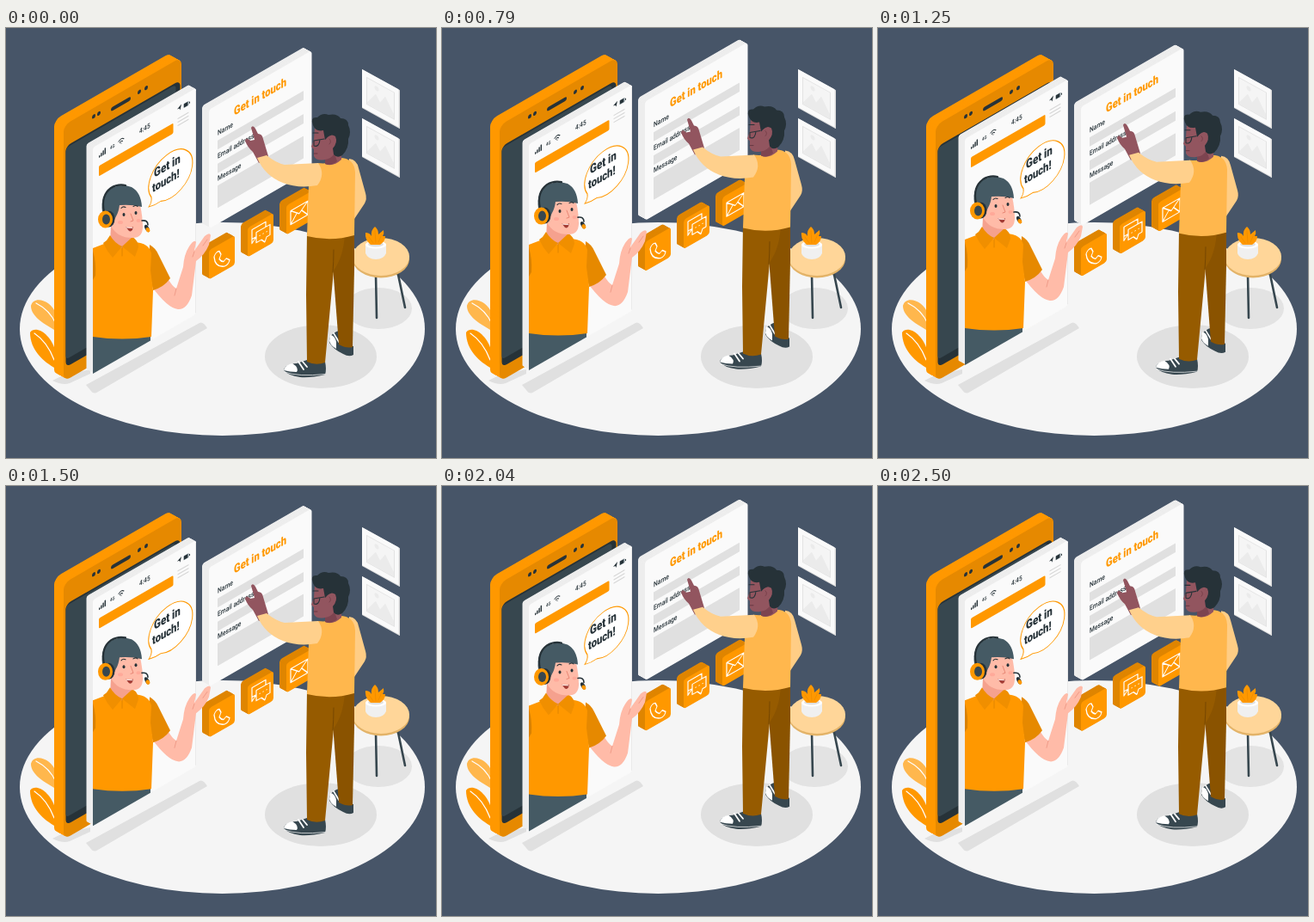
These frames come from a looping animation (500 px wide and 500 px high, 2.54 s). An HTML page:

```html
<!DOCTYPE html>
<html lang="en">
<head>
<meta charset="utf-8">
<style>
html, body { margin: 0; width: 100%; height: 100%; overflow: hidden; background: #475568; }
svg { display: block; width: 100vw; height: 100vh; }
text { font-family: Roboto, sans-serif; font-weight: 500; fill: #263238; }
.bold { font-weight: 800; }
.line { fill: none; stroke-linecap: round; stroke-linejoin: round; }
</style>
</head>
<body>
<svg id="stage" viewBox="0 0 500 500"></svg>
<script>
const LOOP = 2540, PERIOD = 1500, RISE = 10;
const ORANGE = '#ff9800', SHADE = '#e68900', DARK = '#263238', SLATE = '#37474f', GREY = '#455a64';
const SKIN = '#ffbba8', BROWN_SKIN = '#92555f';

const path = (d, fill, extra = '') => `<path d="${d}" fill="${fill}" ${extra}/>`;
const line = (d, color, width = 1) => `<path class="line" d="${d}" stroke="${color}" stroke-width="${width}"/>`;
const rect = (x, y, w, h, r, fill) => `<rect x="${x}" y="${y}" width="${w}" height="${h}" rx="${r}" fill="${fill}"/>`;
const oval = (x, y, rx, ry, fill, extra = '') => `<ellipse cx="${x}" cy="${y}" rx="${rx}" ry="${ry}" fill="${fill}" ${extra}/>`;
// Upright plane rising to the right
const plane = (x, y, content) => `<g transform="matrix(1 -.577 0 1 ${x} ${y})">${content}</g>`;
const label = (x, y, size, str, attrs = '') =>
  `<text transform="matrix(.8 -.462 0 1 ${x} ${y})" font-size="${size}" ${attrs}>${str}</text>`;

// Extruded board: side layers first, then the front with its content
function slab(x, y, w, h, r, depth, side, front, content = '') {
  let out = '';
  for (let d = depth; d > 0; d -= .5) out += plane(x - d, y - d * .55, rect(0, 0, w, h, r, side));
  return out + plane(x, y, rect(0, 0, w, h, r, front) + content);
}

const floor = oval(251.5, 350, 235.5, 124, '#f5f5f5')
  + oval(366, 382, 65, 37, '#e0e0e0')
  + oval(433, 326, 39, 24, '#e3e3e3')
  + path('M93 415L225 343Q229 341 234 349L107 423Q102 427 98 421Z', '#e0e0e0')
  + path('M54 410L66 404L98 397V402L74 413Q66 416 54 410Z', '#e0e0e0');

const leaves = path('M58 352C46 345 29 336 29 323C32 310 54 317 58 333Z', '#ffb74d')
  + path('M58 396C43 388 28 374 28 354C34 345 53 355 58 378Z', ORANGE)
  + line('M35 320Q51 328 58 344M33 355Q48 365 56 386', '#fff', 1.2);

const phone = slab(67, 113, 137, 298, 8, 11, ORANGE, SHADE,
  rect(2.5, 26, 133, 257, 6, DARK)
  + rect(2.5, 28, 128, 246, 4, SLATE)
  + rect(55, 11.5, 23, 4.5, 2.2, DARK)
  + [[35, 10], [41, 10], [88, 12], [96, 12]].map(([x, y]) => oval(x, y, 2, 2.3, DARK)).join(''));

const picture = y => `<g transform="matrix(1 .55 0 1 414 ${y})">`
  + rect(0, 0, 44, 45, .5, '#dcdcdc') + rect(0, 0, 42.5, 44, .5, '#fafafa')
  + rect(5, 6, 33, 32, 0, '#e3e3e3') + rect(6, 7, 31, 30, 0, '#f5f5f5')
  + path('M6 35L16 20L21 27L27 17L37 32V37H6Z', '#ebebeb') + oval(17, 13, 2.6, 2.6, '#ebebeb') + '</g>';

const table = line('M430 286L431 337M455 282L464 325', SLATE, 2.6)
  + oval(436, 268.5, 33, 22, '#e3b368') + oval(436, 266, 33, 22, '#ffd699')
  + path('M418 252V262Q421 269 430 269Q439 269 442 262V252Z', '#f0f0f0')
  + oval(430, 252, 12, 4.5, '#fff') + oval(430, 251.5, 9, 3, '#e0e0e0')
  + path('M424 252Q417 246 418 238Q423 238 425 242Q424 235 429 231Q433 234 433 240L439 235Q440 239 438 242L441 242Q441 248 435 252Z', ORANGE)
  + line('M422 243L427 250M429 236L430 250M437 240L433 249', SHADE, .6);

const form = slab(236, 95, 119.5, 138.5, 3.5, 8, '#ededed', '#fafafa',
    [[41.5, 10.5], [68.5, 11], [94, 26]].map(([y, h]) => rect(10, y, 100, h, .5, '#e0e0e0')).join(''))
  + label(265, 102, 14, 'Get in touch', `class="bold" style="fill:${ORANGE}"`)
  + label(246, 125, 8.4, 'Name') + label(246, 152, 8.4, 'Email address') + label(246, 178, 8.4, 'Message');

const glyphs = [
  'M6 11Q8 6 12 8L14 13L12 17Q14 21 17 23L20 21L24 25Q23 30 18 29Q7 24 6 11Z',
  'M10 16H5V5H21V11M10 11H26V23H22L20 28L16 23H10ZM5 16V21L10 16M14 17H14.2M18 17H18.2M22 17H22.2',
  'M5 9H25V25H5ZM5 9L15 18L25 9M5 25L12 16M25 25L18 16'];
const icons = glyphs.map((d, i) =>
  slab(236 + 45 * i, 258.5 - 26 * i, 30, 34, 3, 8, '#df8500', ORANGE, line(d, '#fff', 1.2))).reverse().join('');

const man =
  // trousers and shoes
  path('M387 352L390 368L404 370V380Q399 383 392 379Q381 374 376 366Q375 356 387 352Z', SLATE)
  + path('M377 357Q382 357 384 365L384 373Q377 369 376 364Z', '#fff')
  + line('M381 355L387 365', '#fff', 1.7)
  + path('M350 386L371 388Q373 397 371 403Q354 407 342 406Q328 404 323 398Q324 391 338 390Z', SLATE)
  + path('M323 398Q325 391 333 390Q341 395 338 400Q330 400 323 398Z', '#fff')
  + line('M340 388L346 397M345 388L350 394', '#fff', 1.8)
  + line('M324 400Q340 406 371 402.500', '#fff', .7)
  + path('M378 240L405 236L405 280L403 371Q396 373 387 368L381 290Z', '#8a5300')
  + path('M350 238H394Q393 265 381 282L371 389Q360 393 350 388L349 310Z', '#965b00')
  + line('M381 258Q381 272 380 284', '#6e4200', .8)
  // pointing hand
  + path('M285 116Q287 112 290 117L293 123Q298 123 299 129L305 149L294 157L287 144Q281 139 278 131Q279 126 284 131L289 130Z', BROWN_SKIN)
  // right arm, torso, left sleeve
  + path('M399 152Q408 153 410 163L418 192Q420 199 417 204L405 222L398 215Z', '#ffcd85')
  + path('M362 157Q380 159 388 151Q405 151 406 168L405 241Q378 249 350 242L352 183Z', '#ffb74d')
  + path('M303 148Q314 157 324 159L363 157Q372 170 362 183Q340 187 322 180Q301 172 292 151Z', '#ffd08c')
  // head
  + path('M359 116L358 130L355 138L358 141L358 149Q361 155 371 153V158Q380 162 390 153L391 122Z', BROWN_SKIN)
  + path('M371 153Q378 152 382 146L385 155Q378 161 371 158Z', '#7d4450')
  + path('M357 113Q353 103 362 104Q368 98 375 101Q385 99 389 105Q398 105 398 113Q402 121 398 129Q399 140 391 148Q385 152 381 147L380 140Q386 133 383 126Q378 122 373 128L371 130L369 119Q360 121 357 113Z', DARK)
  + oval(376.5, 132, 4.5, 6, BROWN_SKIN) + line('M376 129Q379 132 376 135', '#6d3843', .7)
  + line('M357 122L363 122M370 129L358 131V137Q364 139 365 130', DARK, 1.1)
  + line('M358 146H362', '#5f303b', .8);

const statusBar =
  [0, 1, 2, 3].map(i => rect(7 + i * 2.2, 13.500 - i * 1.6, 1.4, 2.500 + i * 1.6, .4, DARK)).join('')
  + line('M30 10.500Q33 7 36 10.500M31.500 12.500Q33 10.500 34.500 12.500M33 14V14.100', DARK, 1)
  + path('M98 12L103 9L101.500 15L100.500 12.500Z', DARK)
  + rect(105.500, 10, 6, 5, .8, '#78868d') + rect(106, 10.500, 4, 4, .3, DARK) + rect(112, 11.500, 1, 2, 0, DARK)
  + line('M99 23.500H111M99 27.500H111M99 31.500H111', '#d5d5d5', 1.2);

const operatorHead =
  path('M122 230H147V248L134 256L121 249Z', '#f5a18e')
  + path('M117 247L121 241Q126 250 135 254L124 267Q117 259 113 250ZM147 243Q154 247 154 255L150 266L135 254Z', '#f08f00')
  + line('M135 254V265', '#d98100', .8)
  + path('M121 205Q137 194 156 206Q159 220 159 231Q159 244 147 244Q129 244 122 230Z', SKIN)
  + path('M113 219Q108 198 120 188Q132 180 146 185Q157 191 158 208Q147 205 132 206Q131 214 128 219L123 229Z', GREY)
  + line('M134 209.500Q136 207 139 208.500M148 207.500Q151 205.500 153 207.500', DARK, 1.1)
  + oval(137, 217, 1.5, 2, DARK) + oval(151, 215, 1.5, 2, DARK)
  + line('M145 216L148 224L145 225', '#e88775', 1)
  + path('M139 231Q144 234 148 231Q147 238 143 236Z', '#a33c35') + line('M140 232L147 232.500', '#fff', .8)
  + oval(133, 226, 3, 2, '#ffa999') + oval(154, 224, 2.500, 2, '#ffa999')
  // headset
  + line('M114 213Q110 195 122 186Q130 181 139 183', DARK, 2.2)
  + oval(119.5, 222, 7, 9.500, DARK) + oval(115.5, 222.5, 8.500, 10, ORANGE) + oval(116.5, 222.5, 4.5, 6, SLATE)
  + line('M158 224Q165 223 165 229', DARK, 1.6)
  + `<g transform="rotate(-28 164 233)">${oval(164, 233, 2.3, 4.5, DARK)}${oval(164, 235, 2.2, 2.8, ORANGE)}</g>`;

const operator =
  path('M101 352H168V363.500L101 402Z', GREY)
  // forearm and hand
  + path('M169 300L188 291Q193 300 198 303L206 278Q207 263 213 254Q219 245 221 249L219 259L231 242Q237 237 238 241L236 252Q231 264 221 271L216 311Q210 328 200 327Q188 326 169 300Z', SKIN)
  + line('M219 260L217 266M229 253L234 246M198 303L196 311', '#eb9481', .8)
  // shirt
  + path('M167 252Q174 256 177 263L191 291Q184 301 171 305L166 280Z', SHADE)
  + path('M101 256L122 248L150 249Q166 250 169 262L168 282L171 305L169 359Q135 364 101 359Z', ORANGE)
  + path('M101 259Q105 272 104 288L101 293Z', '#d98100')
  + operatorHead;

const screen = slab(101, 139, 120, 263, 2.5, 7.500, '#ededed', '#fafafa',
    rect(7, 25.500, 86.500, 12, 1.5, ORANGE) + statusBar
    + path('M79 108A25.500 26.500 0 1 0 68 97Q69 103 65 106.500Q72 109 79 108Z', '#fff', `stroke="${ORANGE}"`)
    + line('M119.500 3V261', '#e6e6e6', .8))
  + label(121, 141.500, 5.5, '4G') + label(155, 123, 8, '4:45')
  + label(172, 174, 14.5, 'Get in', 'class="bold"') + label(170, 191.5, 14, 'touch!', 'class="bold"')
  + operator;

document.getElementById('stage').innerHTML = floor + leaves + phone + picture(48) + picture(105) + table
  + `<g id="visitor">${form}${icons}${man}</g><g id="screen">${screen}</g>`;

const visitorGroup = document.getElementById('visitor');
const screenGroup = document.getElementById('screen');

// Linear rise and fall, at rest until it starts
function float(group, time) {
  const phase = Math.max(0, time) % PERIOD / PERIOD;
  const y = -RISE * (1 - Math.abs(1 - 2 * phase));
  group.setAttribute('transform', `translate(0 ${y.toFixed(3)})`);
}

function draw() {
  const time = performance.now() % LOOP;
  float(visitorGroup, time);
  float(screenGroup, time - 500);
  requestAnimationFrame(draw);
}
draw();
</script>
</body>
</html>
```
